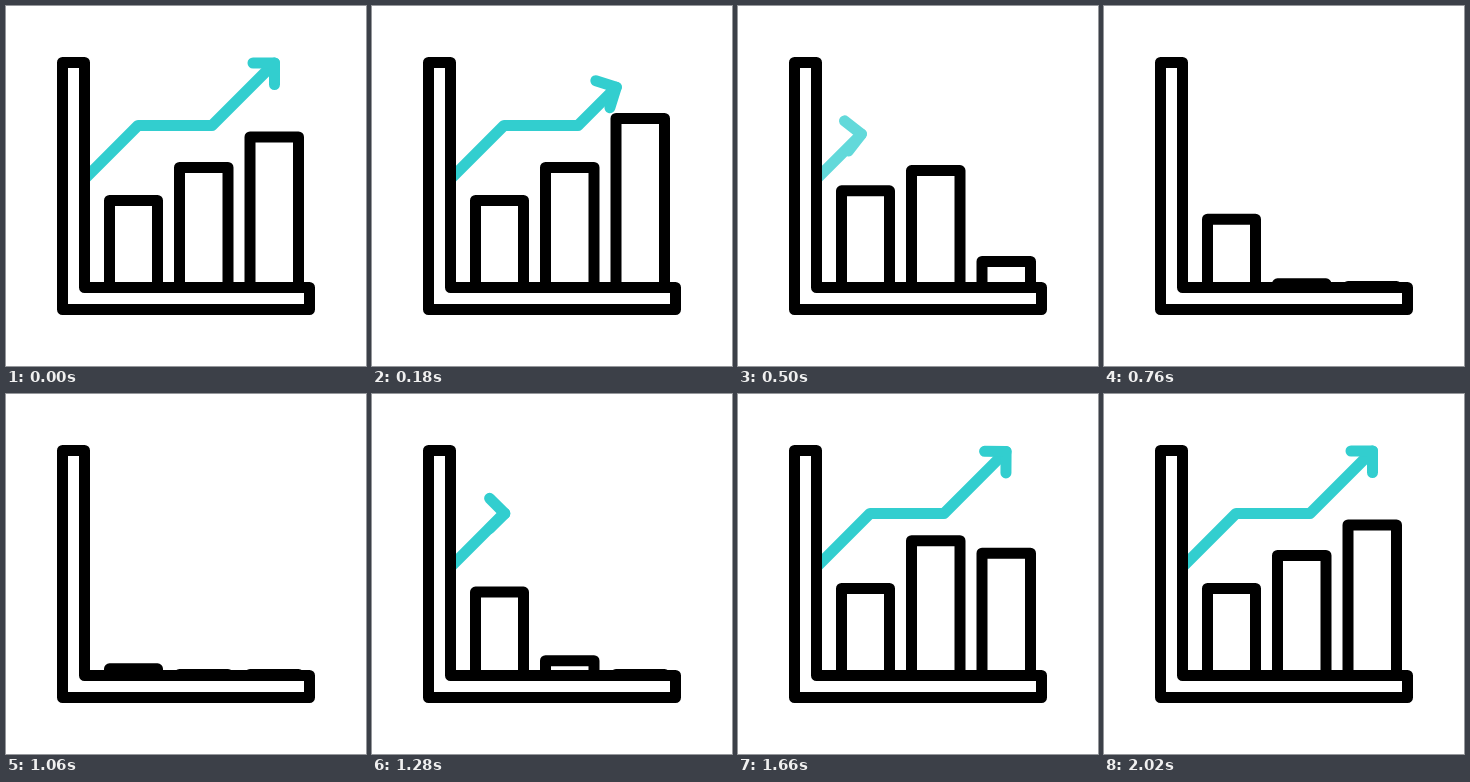
An HTML page for the animation above (2.22 s loop, 360 by 360 pixels).

```html
<!DOCTYPE html>
<html lang="en">
<head>
<meta charset="utf-8">
<title>Growth chart</title>
<style>
  html, body { margin: 0; width: 100%; height: 100%; overflow: hidden; background: #fff; }
  svg { display: block; width: 100vw; height: 100vh; }
  path { fill: none; stroke: #000; stroke-width: 11; stroke-linecap: round; stroke-linejoin: round; }
  #arrow path { stroke: #32cecf; }
</style>
</head>
<body>
<svg viewBox="0 0 360 360">
  <clipPath id="plot"><path d="M79 0H360V360H79Z"/></clipPath>
  <g clip-path="url(#plot)">
    <g id="arrow">
      <path id="line"/>
      <path id="head" d="M-15.2 -15.2L0 0L-15.2 15.2"/>
    </g>
  </g>
  <g id="bars"><path/><path/><path/></g>
  <path d="M56.5 56.5H78.5V281.5H303.5V303.5H56.5Z"/>
</svg>
<script>
const LOOP = 2220, MID = 1000, BASE = 281.5;
const ARROW_TIME = 760, ARROW_OVER = 11, BAR_OVER = 19;
const $ = id => document.getElementById(id);
const clamp = x => Math.min(1, Math.max(0, x));
const ease = x => (x = clamp(x), x * x * (3 - 2 * x));

// x, width, height, start of growth
const bars = [
  [103.5, 48, 87, 0],
  [173.5, 48.5, 120, 200],
  [244, 48.5, 150.5, 400]
];

// Corners of the trend line; the last leg runs on for the overshoot.
const points = [[78, 173.5], [132, 119.5], [206, 119.5], [268.5, 57]];
const legs = points.slice(1).map(([x, y], i) => Math.hypot(x - points[i][0], y - points[i][1]));
const full = legs[0] + legs[1] + legs[2];

// Rises past the goal, then settles back.
const overshoot = (t, rise, fall, goal, extra) =>
  (goal + extra) * ease(t / rise) - extra * ease((t - rise) / fall);

function drawBars(t) {
  const age = MID - Math.abs(MID - Math.min(t, 2 * MID));
  const grown = MID - age; // the way out mirrors the way in
  bars.forEach(([x, w, h, start], i) => {
    const height = Math.max(1, overshoot(grown - start, 400, 200, h, BAR_OVER));
    $('bars').children[i].setAttribute('d', `M${x} ${BASE}v${-height}h${w}v${height}`);
  });
}

function drawArrow(t) {
  const length = t < MID
    ? full * (1 - ease(t / ARROW_TIME))
    : overshoot(t - MID, ARROW_TIME, 240, full, ARROW_OVER);
  let rest = length, leg = 0;
  while (leg < 2 && rest > legs[leg]) rest -= legs[leg++];
  const k = rest / legs[leg], [a, b] = [points[leg], points[leg + 1]];
  const tip = [0, 1].map(i => a[i] + (b[i] - a[i]) * k);
  const angle = [-45 * (1 - k), 0, -45 * clamp(k)][leg];
  $('line').setAttribute('d', 'M' + [...points.slice(0, leg + 1), tip].join('L'));
  $('head').setAttribute('transform', `translate(${tip}) rotate(${angle})`);
  $('arrow').setAttribute('opacity', clamp((length - 26) / 50));
}

function frame() {
  const t = performance.now() % LOOP;
  drawBars(t);
  drawArrow(t);
  requestAnimationFrame(frame);
}
frame();
</script>
</body>
</html>
```
